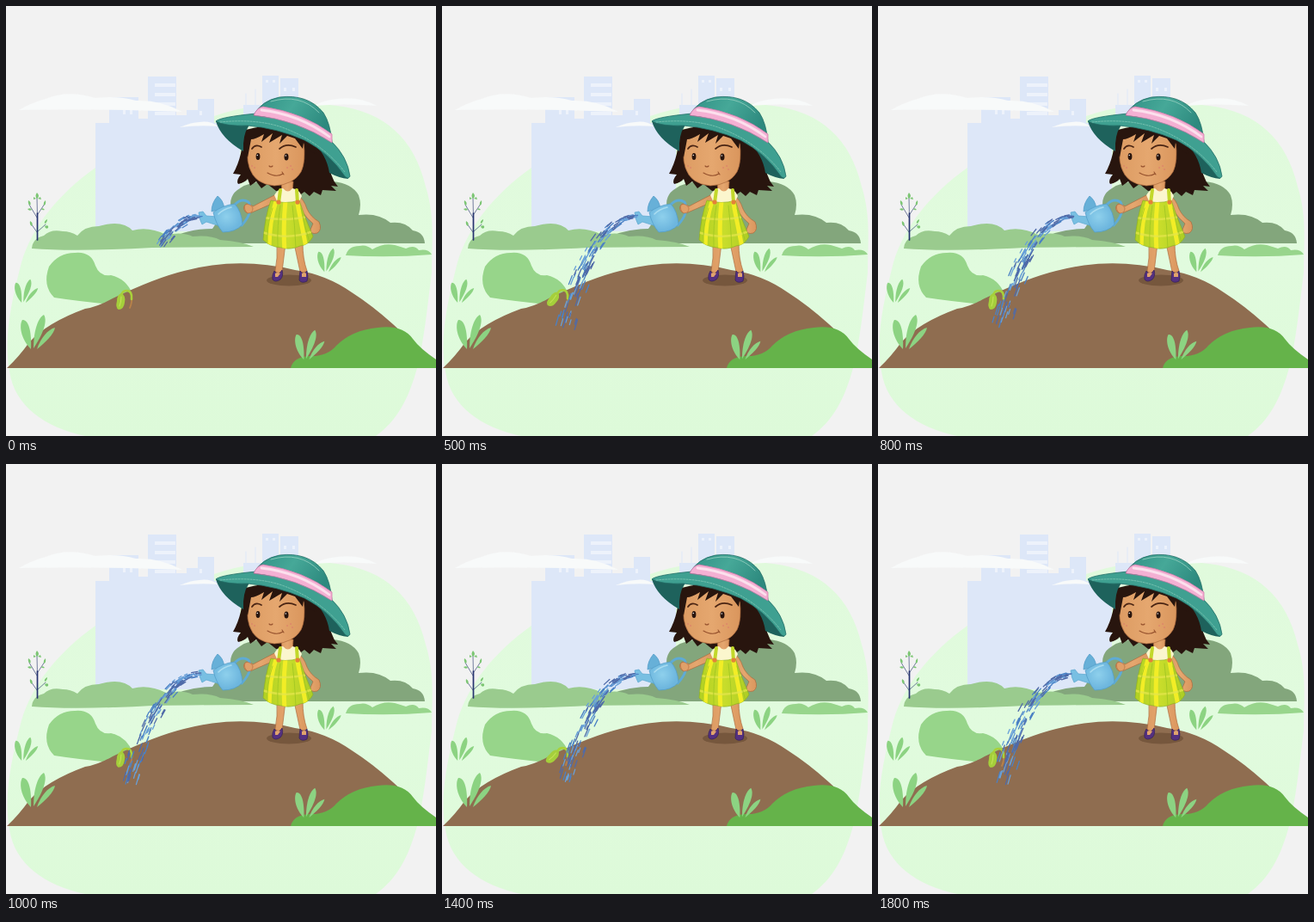
These frames come from a looping animation (500 px wide and 500 px high, 1900 ms). An HTML page:

```html
<!DOCTYPE html>
<html lang="en">
<head>
<meta charset="utf-8">
<title>Watering the garden</title>
<style>
html, body { margin: 0; width: 100%; height: 100%; overflow: hidden; background: #f2f2f2 }
svg { display: block; width: 100vw; height: 100vh }
.line { fill: none; stroke-linecap: round; stroke-linejoin: round }
</style>
</head>
<body>
<svg viewBox="0 0 500 500">
<defs>
  <linearGradient id="lawn" x2="0" y2="1"><stop stop-color="#e0fadc"/><stop offset=".5" stop-color="#e1fbde"/><stop offset="1" stop-color="#ddfad9"/></linearGradient>
  <linearGradient id="skin"><stop stop-color="#dd9c63"/><stop offset=".5" stop-color="#e5a76f"/><stop offset="1" stop-color="#da965d"/></linearGradient>
  <linearGradient id="crown" x2="1" y2=".4"><stop stop-color="#2f8f84"/><stop offset=".5" stop-color="#46a898"/><stop offset="1" stop-color="#2d897e"/></linearGradient>
  <linearGradient id="dress"><stop stop-color="#b1d023"/><stop offset=".5" stop-color="#c8dd2b"/><stop offset="1" stop-color="#accd25"/></linearGradient>
  <radialGradient id="can" cx=".45" cy=".45"><stop stop-color="#8ed0ec"/><stop offset="1" stop-color="#6db6de"/></radialGradient>
  <clipPath id="dressShape"><path id="dressPath" d="M308 226Q325 231 341 226Q347 245 357 268Q352 278 342 279Q331 284 320 281Q307 280 299 272Q301 245 308 226Z"/></clipPath>
  <g id="grass">
    <path d="M12 41C0 29-2 13 2 7C9 6 13 20 12 41Z"/>
    <path d="M15 40C15 18 21 4 27 1C32 9 25 25 15 40Z"/>
    <path d="M19 41C23 28 32 18 40 16C39 23 29 33 19 41Z"/>
  </g>
</defs>

<path fill="url(#lawn)" d="M104 188C160 155 205 139 242 128C290 111 345 110 385 116C440 123 475 154 488 210C499 245 495 275 495 310C490 350 486 390 478 421C468 457 455 482 430 500H92C45 490 10 465 4 425C-3 385 6 345 18 298C31 255 62 218 104 188Z"/>

<g fill="#dde7f8">
  <path d="M104 136H120V106H154V131H165V82H198V127H210V121H223V108H242V136H272V262H104Z"/>
  <path d="M298 81H317V135H298ZM319 84H340V135H319ZM276 115H300V140H276Z"/>
</g>
<path class="line" stroke="#dfe8f8" d="M279 102V118M290 97V118"/>
<path fill="#edf2fb" d="M173 90H197V94H173ZM173 101H197V105H173ZM173 112H197V116H173ZM173 123H197V127H173ZM136 121H139V126H136ZM144 121H147V126H144ZM225 122H228V127H225ZM302 86H305V89H302ZM310 86H313V89H310ZM323 95H326V99H323ZM333 95H336V99H333Z"/>
<g fill="#f8fafa">
  <path d="M15 121Q28 113 46 108Q72 97 104 107Q130 104 151 110Q180 109 205 123Q110 119 15 121Z"/>
  <path d="M202 141Q216 135 225 135Q237 133 247 140Q225 138 202 141Z"/>
  <path d="M358 116Q370 109 386 108Q411 105 431 116Q392 113 358 116Z"/>
</g>

<path fill="#83a67c" d="M188 272Q210 259 240 259Q253 239 262 237Q258 220 272 212Q283 204 305 204H380Q402 206 410 220Q414 231 410 243Q433 240 447 252Q464 250 473 261Q486 263 487 276H250Z"/>
<path fill="#9acb8e" d="M30 282Q31 270 44 267Q52 259 66 262Q75 262 83 267Q91 256 108 256Q135 248 147 261Q166 256 186 266Q206 262 217 268Q238 266 249 272Q275 274 288 280Q240 280 170 281Q80 286 30 282Z"/>
<path fill="#98d58c" d="M395 290Q398 279 411 279Q419 277 426 283Q439 275 452 278Q459 280 465 282Q475 277 480 284Q491 282 495 289Q446 293 395 290Z"/>
<path fill="#97d58a" d="M56 339Q42 325 50 303Q61 287 80 287Q99 285 104 302Q109 315 122 313Q140 317 147 335Q137 349 122 347Q82 343 56 339Z"/>

<g class="line" stroke="#3a4878">
  <path stroke-width=".7" d="M36.500 246L36 222M36 246L27 231M37 242L45 230M36 263L29 253M37 262L46 254"/>
  <path stroke="#26336f" stroke-width="1.700" d="M36.500 272V241"/>
</g>
<path fill="#7cc673" d="M36 217Q40 221 36 224Q33 221 36 217ZM26 226Q30 228 28 232Q25 230 26 226ZM46 226Q47 231 44 232Q43 228 46 226ZM28 250Q32 252 30 256Q27 254 28 250ZM48 248Q48 252 45 253Q44 250 48 248ZM45 256Q50 254 49 258Q46 260 45 256ZM25 236Q29 234 30 237Q27 239 25 236ZM41 236Q43 234 45 237Q42 238 41 236ZM32 222L35 224L32 225ZM40 222L37 224L41 225Z"/>

<path fill="#8f6d50" d="M1 421Q15 408 27 391Q48 368 92 352Q106 350 124 340Q174 316 207 308Q270 291 336 307Q372 312 402 333Q449 363 500 421Z"/>
<path fill="#65b34a" d="M331 421Q334 408 353 407Q373 408 384 395Q402 377 432 374Q461 370 473 387Q481 398 500 411V421Z"/>
<g fill="#8cd382">
  <use href="#grass" transform="translate(17 358)"/>
  <use href="#grass" transform="translate(10 317) scale(.68)"/>
  <use href="#grass" transform="translate(362 281) scale(.69)"/>
  <use href="#grass" transform="translate(336 376) scale(.86)"/>
</g>

<g id="sprout">
  <path class="line" stroke="#b98249" stroke-width="1.800" d="M144 351Q147 344 146 338"/>
  <path class="line" stroke="#a9d13a" stroke-width="2.600" d="M146 341Q147 331 140 331Q135 331 134 337"/>
  <g id="leaf">
    <path fill="#a5cf3b" d="M134 334Q140 337 138 345Q137 353 131 353Q127 351 129 343Q129 336 134 334Z"/>
    <path class="line" stroke="#c6e35a" d="M134 338Q134 344 132 349"/>
  </g>
</g>

<g id="girl">
  <ellipse cx="329" cy="319" rx="26" ry="6.500" fill="#76573d"/>
  <path fill="#28150e" d="M276 143Q276 174 264 195L273 196Q267 203 270 207Q278 205 281 201L284 209L291 204L297 212L304 207L314 215L335 213L340 221L347 216L353 221L358 216L366 220L368 214L384 215L378 209L386 210Q376 199 375 177L358 157Z"/>
  <g fill="url(#skin)" stroke="#ad6a3e" stroke-width=".7">
    <path d="M315 276H325L321 309Q316 312 313 308Q316 294 315 276ZM335 276H345Q345 294 350 308Q347 311 342 309Z"/>
    <path d="M312 220Q318 222 316 227L286 240Q283 243 278 239Q274 233 280 230Q284 229 287 233Z"/>
    <path d="M340 221Q346 224 350 236Q354 245 364 251Q368 260 362 264Q354 266 354 260L357 253Q343 241 338 226Z"/>
    <path d="M320 204H334L333 218H321Z"/>
  </g>
  <path fill="#fbf6cd" d="M312 220Q317 212 322 212Q328 219 333 212Q341 213 344 221L340 229H316Z"/>
  <use href="#dressPath" fill="url(#dress)" stroke="#8fb120" stroke-width=".7"/>
  <g clip-path="url(#dressShape)">
    <path class="line" stroke="#f2ed26" stroke-width="5" d="M314 227Q306 250 306 285M325 226Q322 253 324 286M338 225Q344 255 350 286"/>
    <path class="line" stroke="#e5e64b" stroke-width="2.500" opacity=".75" d="M300 246Q327 251 354 244M298 263Q328 273 357 262"/>
    <path class="line" stroke="#9dc522" stroke-width=".8" d="M310 235Q303 256 304 278M319 232Q315 255 316 280M333 232Q336 255 337 281M343 235Q347 256 353 275"/>
  </g>
  <path class="line" stroke="#c2d82a" stroke-width="4" d="M319 214L317 229M338 214L339 229"/>
  <g fill="#e58138"><circle cx="317" cy="228" r="2.600"/><circle cx="339" cy="228" r="2.600"/></g>
  <path fill="#543080" stroke="#34205a" stroke-width=".7" d="M312 308Q316 315 321 307Q323 314 319 318Q313 322 310 318Q309 313 312 308ZM342 308Q346 314 350 308Q352 315 350 320Q344 323 341 319Q341 314 342 308Z"/>
  <path fill="#e0a36d" d="M313 311Q316 309 319 311L316 315H313ZM344 311Q347 309 349 311L349 315H344Z"/>

  <path fill="url(#skin)" stroke="#ad6a3e" stroke-width=".7" d="M284 151Q278 174 283 188Q289 207 312 209Q334 208 343 193Q349 181 346 157Q320 139 284 151Z"/>
  <path fill="#28150e" d="M274 146Q310 131 354 155L361 172Q349 168 346 159L345 166L336 154L327 151L318 160L321 150L306 159L310 148L297 158L300 149Q290 155 285 155L281 176Q274 166 274 146Z"/>
  <g fill="#28150e"><ellipse cx="293" cy="175" rx="2.400" ry="4"/><ellipse cx="326" cy="175.500" rx="2.500" ry="4.100"/></g>
  <g fill="#fff"><circle cx="292.300" cy="173.500" r=".7"/><circle cx="325.300" cy="174" r=".7"/></g>
  <path class="line" stroke="#4a2413" stroke-width="1.700" d="M286 166Q290 160 297 164M318 166Q326 159 337 164"/>
  <path class="line" stroke="#94502c" stroke-width="1.100" d="M304 194Q315 200 322 195M321 193L323 196M306 186Q308 188 310 186"/>
  <path class="line" stroke="#dc776b" stroke-width="1.500" d="M327 188h.1M331 186h.1M333 190h.1M286 186h.1M289 188h.1"/>

  <path fill="#1e625c" d="M244 134Q250 154 276 169Q275 150 282 140L290 128ZM355 156Q373 173 376 194Q387 200 398 201L385 170Z"/>
  <path fill="#3fa091" stroke="#226e66" stroke-width=".8" d="M244 134Q249 129 291 125Q335 130 378 157Q397 175 400 198Q398 202 394 198Q376 171 347 156Q315 142 281 139Q255 140 244 134Z"/>
  <path class="line" stroke="#83c9b7" stroke-width=".8" stroke-dasharray="2 1.500" d="M249 135Q288 131 318 140Q365 156 394 193"/>
  <path fill="url(#crown)" stroke="#226e66" stroke-width=".8" d="M288 127Q297 110 318 106Q351 102 369 124Q377 136 379 158Q336 129 288 127Z"/>
  <path class="line" stroke="#86c8b8" d="M308 111Q342 101 364 124"/>
  <path fill="#f4b0d3" stroke="#cf75a6" stroke-width=".7" d="M288 127Q292 118 299 117Q346 124 379 149L379 159Q338 132 288 127Z"/>
  <path class="line" stroke="#fce0ed" stroke-width="2.800" d="M297 121Q341 126 376 152"/>

  <path class="line" stroke="#5fabd4" stroke-width="3" d="M266 231Q274 223 282 228Q288 240 274 255"/>
  <path fill="#67b0d8" stroke="#4d99c5" stroke-width=".7" d="M239 239Q239 229 246 221Q252 225 254 235Z"/>
  <path fill="#78bfe2" stroke="#5ba7cf" stroke-width=".7" d="M224 240L229 239L233 244L246 245L249 256L233 251L228 254Q225 249 224 240Z"/>
  <path fill="url(#can)" stroke="#559fc9" stroke-width=".8" d="M241 240Q251 232 266 230Q274 239 275 254Q267 263 252 263Q244 254 241 240Z"/>
  <path class="line" stroke="#a9dcf0" stroke-width="1.600" d="M247 242Q253 236 262 234"/>
  <path fill="#e0a069" stroke="#ad6a3e" stroke-width=".6" d="M278 231Q284 229 287 235Q287 241 281 241Q276 237 278 231Z"/>
</g>

<g id="water" class="line" stroke-width="1.300">
  <path stroke="#4a80c4"/><path stroke="#68a0d8"/><path stroke="#4f6aa8"/>
</g>
</svg>
<script>
const LOOP = 1900, STEP = 100, SWAY = 950, FLOWS = 6;
const leaf = document.getElementById('leaf');
const sprout = document.getElementById('sprout');
const inks = document.querySelectorAll('#water path');

let seed = 17;
const random = () => (seed = seed * 16807 % 2147483647) / 2147483647;
const drops = Array.from({ length: 150 }, (_, i) => ({
  phase: random(), side: random() + random() - 1, length: 5 + random() * 8, ink: i % 3
}));

// Quadratic arc from the spout to the soil, with its unit tangent.
function arc(s) {
  const r = 1 - s;
  const x = 225 * r * r + 2 * 178 * r * s + 143 * s * s;
  const y = 245 * r * r + 2 * 247 * r * s + 369 * s * s;
  const dx = -94 * r - 70 * s, dy = 4 * r + 244 * s, n = Math.hypot(dx, dy);
  return { x, y, tx: dx / n, ty: dy / n };
}

function drawWater(t) {
  const front = 0.52 + t / 250, paths = ['', '', ''];
  for (const drop of drops) {
    const s = (drop.phase + t * FLOWS / LOOP) % 1;
    if (s > front) continue;
    const { x, y, tx, ty } = arc(s);
    const offset = drop.side * (3 + 13 * s);
    const half = drop.length * (0.55 + 0.45 * s) / 2;
    const cx = x - ty * offset, cy = y + tx * offset;
    paths[drop.ink] += `M${cx - tx * half} ${cy - ty * half}L${cx + tx * half} ${cy + ty * half}`;
  }
  inks.forEach((ink, i) => ink.setAttribute('d', paths[i]));
}

function draw(now) {
  const t = Math.floor(now % LOOP / STEP) * STEP;
  const lift = ((1 + Math.cos((t - 390) / SWAY * 2 * Math.PI)) / 2) ** 2;
  leaf.setAttribute('transform', `rotate(${lift * 38} 135 335)`);
  sprout.setAttribute('transform', `translate(0 ${-lift})`);
  drawWater(t);
  requestAnimationFrame(() => draw(performance.now() - start));
}
const start = performance.now();
draw(0);
</script>
</body>
</html>
```
